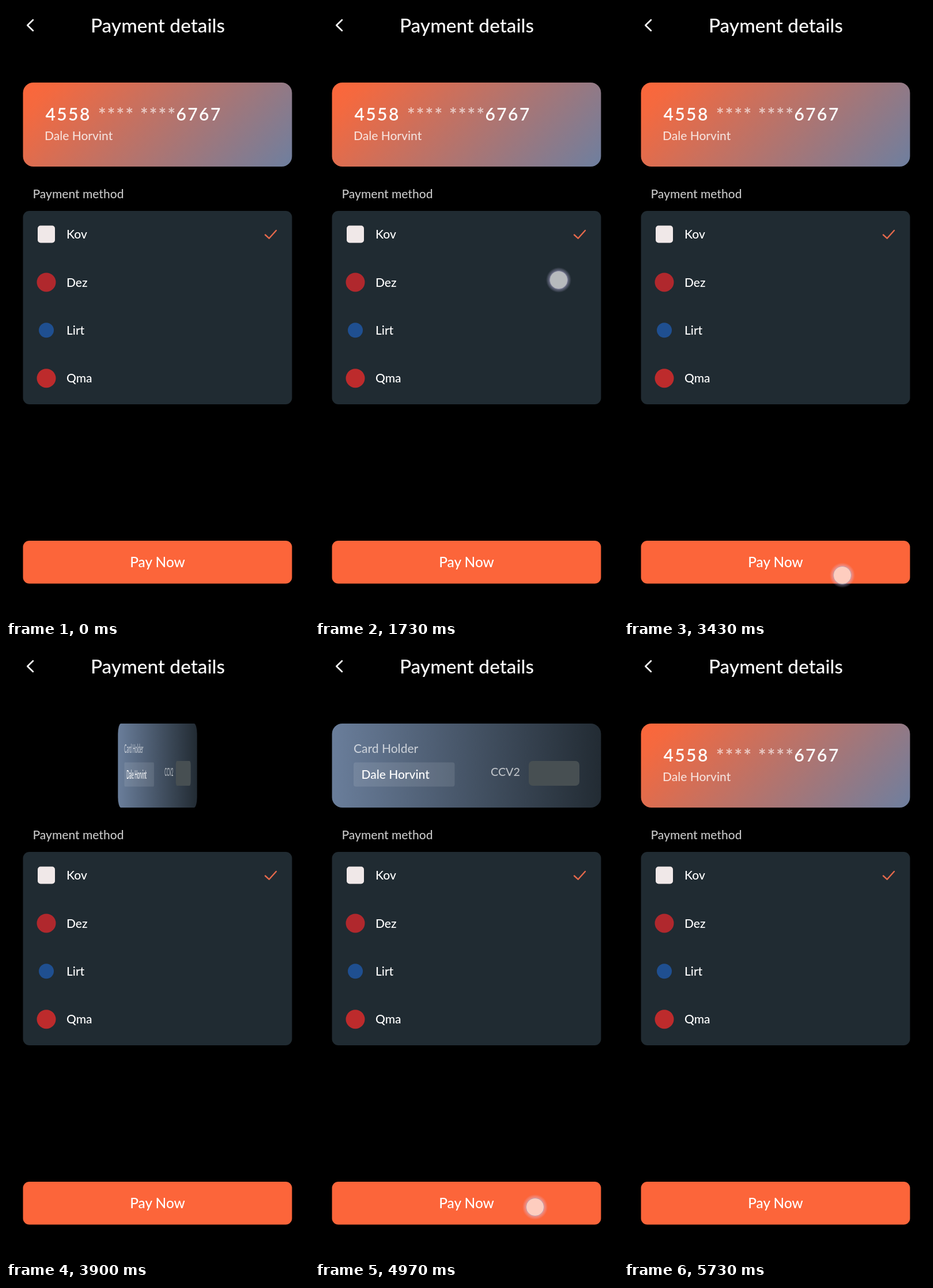
Animation of 526x1065 px, one loop 5760 ms. Source, as an HTML page:

```html
<!DOCTYPE html>
<html lang="en">
<head>
<meta charset="utf-8">
<title>Payment details</title>
<style>
  html, body { margin: 0; width: 100%; height: 100%; overflow: hidden; background: #000; }
  svg { display: block; width: 526px; height: 1065px; }
  text { font: 500 21px Lato, "Open Sans", sans-serif; fill: #fff; white-space: pre; }
  .title { font-size: 33.4px; text-anchor: middle; }
  .pay { font-size: 24.4px; text-anchor: middle; }
  .digits { font-size: 30px; font-weight: 600; letter-spacing: 2.4px; }
  .stars { font-size: 32px; font-weight: 700; letter-spacing: 2.2px; fill-opacity: .62; }
  .code { font-size: 19.8px; }
  .soft { fill-opacity: .78; }
  .dim { fill-opacity: .66; }
  .line { fill: none; stroke-linecap: round; stroke-linejoin: round; }
</style>
</head>
<body>
<svg viewBox="0 0 526 1065">
  <defs>
    <linearGradient id="warm" gradientUnits="userSpaceOnUse" x1="29" y1="132.5" x2="335.5" y2="439">
      <stop offset="0" stop-color="#fd663a"/>
      <stop offset=".1" stop-color="#f4693f"/>
      <stop offset="1" stop-color="#6e7f9f"/>
    </linearGradient>
    <linearGradient id="cool">
      <stop offset="0" stop-color="#6a7e9b"/>
      <stop offset="1" stop-color="#222b33"/>
    </linearGradient>
    <radialGradient id="glow">
      <stop offset=".68" stop-color="#d8d0ff" stop-opacity="0"/>
      <stop offset=".7" stop-color="#d8d0ff" stop-opacity=".42"/>
      <stop offset="1" stop-color="#d8d0ff" stop-opacity="0"/>
    </radialGradient>
  </defs>

  <rect width="526" height="1065"/>
  <path class="line" d="M46.8 24.3L37.3 33.5L46.8 42.7" stroke="#fff" stroke-width="2.7"/>
  <text class="title" x="263.5" y="46">Payment details</text>

  <g id="card">
    <g id="front">
      <rect x="29.5" y="133" width="467" height="146" rx="18" fill="url(#warm)"/>
      <text class="digits" x="68.5" y="198.5">4558</text>
      <text class="stars" x="160" y="200.5">****</text>
      <text class="stars" x="233" y="200.5">****</text>
      <text class="digits" x="295.5" y="198.5">6767</text>
      <text class="soft" x="67" y="233">Dale Horvint</text>
    </g>
    <g id="back">
      <rect x="29.5" y="133" width="467" height="146" rx="18" fill="url(#cool)"/>
      <text class="dim" x="67" y="184">Card Holder</text>
      <rect x="67" y="200.5" width="175.5" height="42" rx="4" fill="#fff" fill-opacity=".1"/>
      <text x="80.5" y="229">Dale Horvint</text>
      <text class="dim code" x="305" y="224">CCV2</text>
      <rect x="371" y="198" width="88" height="43" rx="7" fill="#474f52"/>
    </g>
  </g>

  <text class="soft" x="46.5" y="333.5">Payment method</text>
  <rect x="29.5" y="356" width="467" height="336" rx="11" fill="#202b32"/>
  <g id="rows"></g>
  <path id="check" class="line" d="M450 397.5L456.7 403.7L469 390" stroke="#e5694c" stroke-width="2.4"/>

  <rect x="29.5" y="929" width="467" height="74.5" rx="11" fill="#fc653a"/>
  <text class="pay" x="263" y="974.5">Pay Now</text>

  <g id="touch">
    <circle r="22" fill="url(#glow)"/>
    <circle r="15.5" fill="#fff" fill-opacity=".68" stroke="#777496" stroke-opacity=".4"/>
  </g>
</svg>
<script>
const LOOP = 5760, ROW = 83.4, FLIP = 690, MID = 263;
const $ = id => document.getElementById(id);

const banks = [
  ["Kov", "#f0e8e8", 15, 5],
  ["Dez", "#b0282d", 16.5, 16.5],
  ["Lirt", "#1f4f90", 13, 13],
  ["Qma", "#bd2b2c", 16.5, 16.5]
];
$("rows").innerHTML = banks.map(([name, color, r, corner], i) => {
  const y = 396.5 + i * ROW;
  return `<rect x="${70 - r}" y="${y - r}" width="${2 * r}" height="${2 * r}" rx="${corner}" fill="${color}"/>
    <text x="105" y="${y + 7.7}">${name}</text>`;
}).join("");

// touch: start, end, x, y
const taps = [
  [1730, 1850, 423, 476],
  [2200, 2330, 423, 557],
  [2530, 2630, 423, 640],
  [2900, 3010, 421, 400],
  [3430, 3540, 379, 989],
  [4970, 5090, 382, 973]
];
// selection: time, row
const picks = [[0, 0], [1850, 1], [2330, 2], [2630, 3], [3010, 0]];

const ease = p => (1 - Math.cos(Math.PI * Math.min(1, Math.max(0, p)))) / 2;
const show = (el, on) => el.setAttribute("visibility", on ? "visible" : "hidden");

function draw(t) {
  const turn = ease((t - 3514) / FLIP) - ease((t - 5040) / FLIP);
  const scale = Math.max(.002, Math.abs(Math.cos(Math.PI * turn)));
  $("card").setAttribute("transform", `translate(${MID * (1 - scale)} 0) scale(${scale} 1)`);
  show($("front"), turn < .5);
  show($("back"), turn >= .5);

  const row = picks.filter(p => p[0] <= t).pop()[1];
  $("check").setAttribute("transform", `translate(0 ${row * ROW})`);

  const tap = taps.find(([from, to]) => t >= from && t < to);
  show($("touch"), tap);
  if (tap) $("touch").setAttribute("transform", `translate(${tap[2]} ${tap[3]})`);
}

const start = performance.now();
function tick() {
  draw((performance.now() - start) % LOOP);
  requestAnimationFrame(tick);
}
tick();
</script>
</body>
</html>
```
